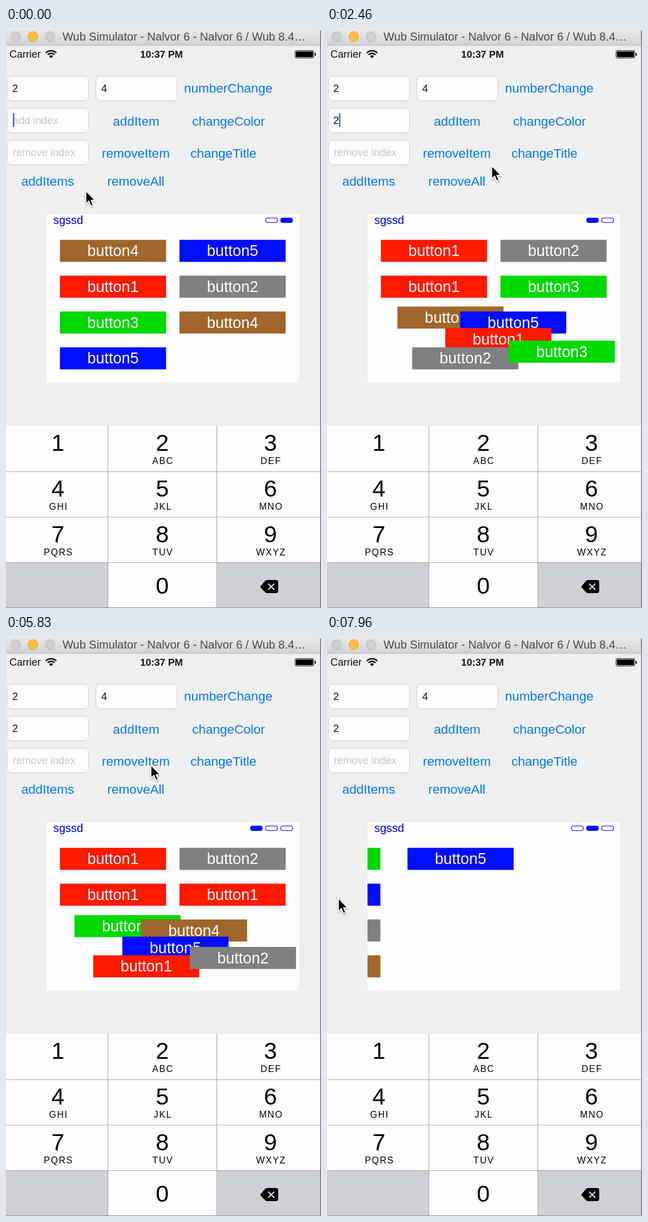
An HTML page that plays this animation: 552 px wide and 1015 px high, repeating every 8000 ms.

```html
<!DOCTYPE html>
<html lang="en">
<head>
<meta charset="utf-8">
<title>Button pager</title>
<style>
  html, body { margin: 0; width: 100%; height: 100%; overflow: hidden; background: #efeff0; }
  svg { display: block; width: 552px; height: 1015px; font-family: "Liberation Sans", Arial, sans-serif; }
  text { white-space: pre; }
</style>
</head>
<body>
<svg id="stage" viewBox="0 0 552 1015">
  <defs>
    <linearGradient id="bar" x2="0" y2="1">
      <stop offset="0" stop-color="#ebebeb"/>
      <stop offset="1" stop-color="#d3d3d3"/>
    </linearGradient>
    <clipPath id="panelClip"><rect x="71" y="326" width="443" height="295"/></clipPath>
    <filter id="shade" x="-50%" y="-50%" width="200%" height="200%">
      <feDropShadow dx="0" dy="2" stdDeviation="1.5" flood-opacity=".35"/>
    </filter>
  </defs>
</svg>
<script>
const LOOP = 8000;
const FIRST_ADD = 1930, SECOND_ADD = 5292, TYPED = 1000, SETTLED = 7193;
const PAGE = 443, PER_PAGE = 8;
const COLORS = ['#ff1a00', '#808080', '#00d900', '#a0662c', '#000dff'];
const LINK = '#0577ea', PAPER = '#fdfdff', BLUE = '#000dff';
const stage = document.getElementById('stage');

function add(tag, attrs, parent = stage) {
  const el = document.createElementNS('http://www.w3.org/2000/svg', tag);
  for (const key in attrs) el.setAttribute(key, attrs[key]);
  parent.append(el);
  return el;
}
function rect(x, y, width, height, fill, more, parent) {
  return add('rect', { x, y, width, height, fill, ...more }, parent);
}
function label(text, x, y, size, fill, more, parent) {
  const el = add('text', { x, y, 'font-size': size, fill, ...more }, parent);
  el.textContent = text;
  return el;
}
const middle = { 'text-anchor': 'middle' };

// Window frame and title bar
rect(0, 0, 552, 1015, '#efeff0');
rect(0, 0, 551, 31, 'url(#bar)');
rect(0, 30, 551, 1, '#c4c4c4');
[[17, '#cfcfd1', '#b9b9bb'], [47, '#fdbc40', '#e0a135'], [77, '#cfcfd1', '#b9b9bb']].forEach(
  ([cx, fill, stroke]) => add('circle', { cx, cy: 15, r: 8.6, fill, stroke }));
label('Wub Simulator - Nalvor 6 - Nalvor 6 / Wub 8.4…', 99, 22, 20, '#4a4a4a');

// Status bar
label('Carrier', 6, 52, 18, '#111');
[[13, 9.3], [8.6, 6.1]].forEach(([r, d]) => add('path', {
  d: `M${79 - d} ${53 - d}A${r} ${r} 0 0 1 ${79 + d} ${53 - d}`,
  fill: 'none', stroke: '#111', 'stroke-width': 2.6
}));
add('path', { d: 'M75.5 49.3A5 5 0 0 1 82.500 49.3L79 53Z', fill: '#111' });
label('10:37 PM', 272.5, 52, 17.3, '#111', { ...middle, 'font-weight': 700 });
rect(506.5, 39.5, 33, 13, 'none', { rx: 2.5, stroke: '#111' });
rect(508, 41, 30, 10, '#000', { rx: 1 });
rect(541, 43.5, 2, 5, '#111', { rx: 1 });

// Form
function field(x, y) {
  rect(x + .5, y + .5, 142, 43, PAPER, { rx: 7.5, stroke: '#cfcfd3' });
}
[[2, 84], [157, 84], [2, 140], [2, 196]].forEach(([x, y]) => field(x, y));
label('2', 11, 112, 18, '#111');
label('4', 167, 112, 18, '#111');
label('remove index', 12, 224, 18.3, '#c7c7cd');
const hint = label('add index', 12, 168, 18.3, '#c7c7cd');
const typed = label('2', 11, 168, 18, '#111');
const caret = rect(12, 149, 2.5, 24, '#426bf2');

const link = (text, x, y) => label(text, x, y, 22.5, LINK, middle);
link('numberChange', 389.5, 113);
link('changeColor', 390, 171);
link('removeItem', 227.5, 227);
link('changeTitle', 381, 227);
link('addItems', 73, 276);
link('removeAll', 227.5, 276);
const addLink = link('addItem', 228, 171);

// Panel with pages of buttons
rect(71, 326, 443, 295, PAPER);
label('sgssd', 83, 343, 20, '#0000c8');
const dots = [428.5, 455, 481.5].map(x =>
  rect(x, 332.5, 20.5, 8, PAPER, { rx: 3.5, stroke: BLUE, 'stroke-width': 1.2 }));
const clip = add('g', { 'clip-path': 'url(#panelClip)' });
const scroller = add('g', {}, clip);
const pool = Array.from({ length: 17 }, () => {
  const g = add('g', {}, scroller);
  return { g, box: rect(0, 0, 186, 38.6, '', {}, g), text: label('', 93, 28.6, 27, '#fdfdff', middle, g) };
});

// Keypad
rect(0, 696, 551, 318, PAPER);
rect(0, 936, 178, 78, '#ced2d7');
rect(370, 936, 181, 78, '#ced2d7');
const LETTERS = ['', 'ABC', 'DEF', 'GHI', 'JKL', 'MNO', 'PQRS', 'TUV', 'WXYZ'];
const KEY_X = [91, 274, 463.5];
LETTERS.forEach((word, i) => {
  const x = KEY_X[i % 3], y = 740 + 80 * Math.floor(i / 3);
  label(i + 1, x, y, 41, '#000', middle);
  label(word, x + 1, y + 23, 16, '#000', { ...middle, 'letter-spacing': 1.6 });
});
label('0', 274, 990, 41, '#000', middle);
[776, 855.5, 935].forEach(y => rect(0, y, 551, 1, '#a6a6a0'));
[178, 369].forEach(x => rect(x, 696, 1, 318, '#a6a6a0'));
add('path', {
  d: 'M446 977L454 967.500Q455.500 966 458 966H473Q477 966 477 970V985Q477 989 473 989H458Q455.500 989 454 987.500L446 979Q445 978 446 977Z'
});
add('path', { d: 'M459.500 972.500L470 983M470 972.500L459.500 983', stroke: '#e4e6e8', 'stroke-width': 2 });

// Window edge
rect(550.5, 4, 1.5, 1010, '#77757c');
rect(0, 1014, 552, 1, '#8b8d90');

const pointer = add('path', {
  d: 'M0 0V22.500L5.200 17.800L8.900 26.500L12.700 24.900L9 16.400H16Z',
  fill: '#000', stroke: '#fff', 'stroke-width': 1.5, filter: 'url(#shade)'
});

// Motion tables: time, values, easing towards that row
const smooth = u => u * u * (3 - 2 * u);
const speedUp = u => u * u;
const slowDown = u => 1 - (1 - u) ** 3;
const clamp = u => Math.max(0, Math.min(1, u));

const POINTER = [
  [0, [140, 285]],
  [800, [275, 735]],
  [1080, [275, 735]],
  [1750, [234, 159]],
  [2150, [234, 159]],
  [3000, [414, 430]],
  [4300, [414, 430]],
  [5050, [203, 160]],
  [5380, [203, 160]],
  [5830, [254, 226]],
  [6550, [430, 440]],
  [6650, [430, 440]],
  [6900, [184, 440], speedUp],
  [7120, [184, 440]],
  [7600, [380, 456]],
  [7700, [380, 456]],
  [7880, [20, 459], speedUp]
];
const SCROLL = [
  [0, [PAGE]],
  [FIRST_ADD, [PAGE]],
  [FIRST_ADD + 300, [0]],
  [6650, [0]],
  [6900, [246], speedUp],
  [SETTLED, [PAGE], slowDown],
  [7700, [PAGE]],
  [7880, [803], speedUp],
  [8342, [2 * PAGE], slowDown]
];

function sample(rows, t) {
  const next = rows.findIndex(row => row[0] > t);
  if (next < 0) return rows[rows.length - 1][1];
  const [t0, from] = rows[next - 1], [t1, to, ease = smooth] = rows[next];
  const u = ease((t - t0) / (t1 - t0));
  return from.map((v, i) => v + (to[i] - v) * u);
}

function slot(i) {
  const page = Math.floor(i / PER_PAGE), n = i % PER_PAGE;
  return [94.5 + 209.5 * (n % 2) + PAGE * page, 370.7 + 62.7 * Math.floor(n / 2)];
}

const base = Array.from({ length: 15 }, (_, i) => i % 5);
const insert = list => [...list.slice(0, 2), 0, ...list.slice(2)];
const once = insert(base), twice = insert(once);

function drawButtons(t) {
  const list = t < FIRST_ADD ? base : t < SECOND_ADD ? once : twice;
  const start = t < SECOND_ADD ? FIRST_ADD : SECOND_ADD;
  pool.forEach(({ g, box, text }, i) => {
    const kind = list[i];
    g.style.display = kind === undefined ? 'none' : '';
    if (kind === undefined) return;
    let [x, y] = slot(i);
    if (list !== base && i > 2) {
      // Each later button sets off a tenth of a second after the one before
      const u = clamp((t - start - 100 * (i - 3)) / 500);
      const [px, py] = slot(i - 1);
      x = px + (x - px) * u;
      y = py + (y - py) * u;
    }
    g.setAttribute('transform', `translate(${x} ${y})`);
    box.setAttribute('fill', COLORS[kind]);
    text.textContent = 'button' + (kind + 1);
  });
}

function pressAlpha(t, release) {
  if (t < release - 100) return 1;
  return .25 + .75 * clamp((t - release) / 200);
}

function draw(t) {
  const [px, py] = sample(POINTER, t);
  pointer.setAttribute('transform', `translate(${px} ${py})`);
  scroller.setAttribute('transform', `translate(${-sample(SCROLL, t)[0]} 0)`);
  drawButtons(t);

  const count = t < SECOND_ADD ? 2 : 3;
  const page = t < FIRST_ADD || t >= SETTLED ? 1 : 0;
  dots.forEach((dot, i) => {
    const n = i - (3 - count);
    dot.style.display = n < 0 ? 'none' : '';
    dot.setAttribute('fill', n === page ? BLUE : PAPER);
  });

  const filled = t >= TYPED, beat = t % 1000;
  hint.style.display = filled ? 'none' : '';
  typed.style.display = filled ? '' : 'none';
  caret.setAttribute('x', filled ? 21 : 12);
  caret.style.display = t < 640 || (beat > 100 && beat < 640) ? '' : 'none';
  addLink.setAttribute('opacity', t < 3000 ? pressAlpha(t, 1960) : pressAlpha(t, SECOND_ADD));
}

const began = performance.now();
function tick() {
  draw((performance.now() - began) % LOOP);
  requestAnimationFrame(tick);
}
tick();
</script>
</body>
</html>
```
